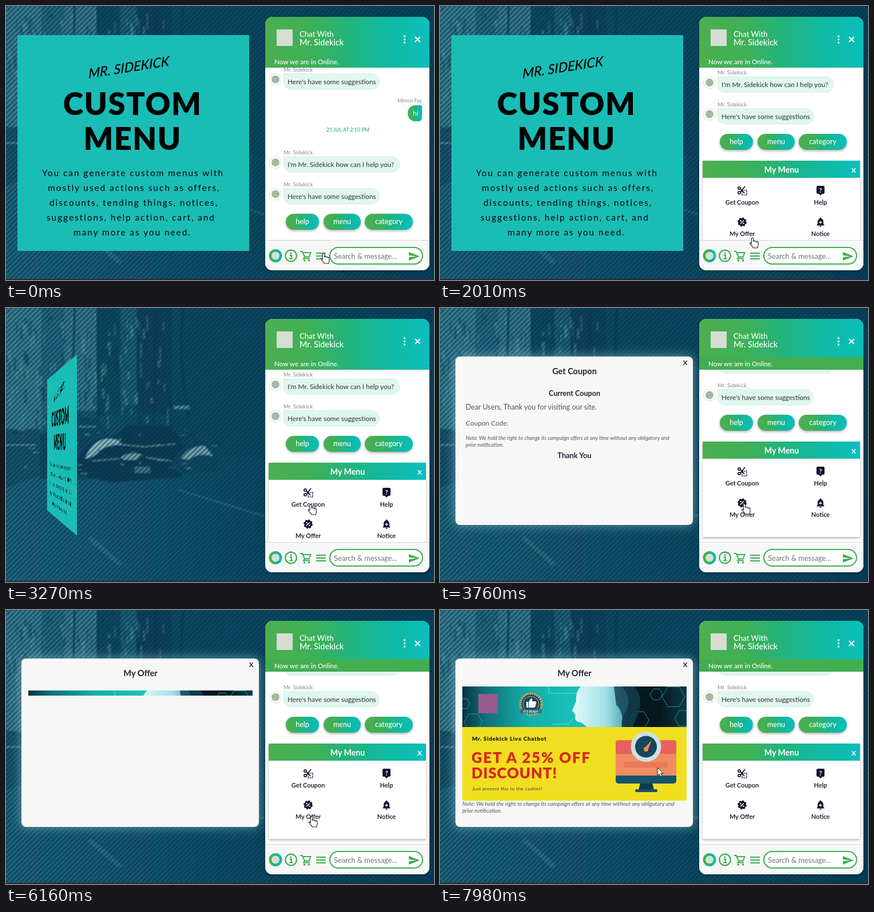
An HTML page for the animation above (8000 ms loop, 748x480 px).

```html
<!DOCTYPE html>
<html lang="en">
<head>
<meta charset="utf-8">
<title>Custom menu</title>
<style>
html, body { margin: 0; width: 100%; height: 100%; overflow: hidden; background: #063c52; }
#stage { position: relative; width: 748px; height: 480px; max-height: 100%; overflow: hidden; contain: strict; }
svg, #face { position: absolute; left: 0; top: 0; width: 748px; height: 480px; }
#face { transform-origin: 374px 240px; backface-visibility: hidden; }
text { font-family: Lato, "Open Sans", sans-serif; white-space: pre; }
.mid { text-anchor: middle; }
.bold { font-weight: 700; }
.black { font-weight: 900; }
.note { font-style: italic; }
.lift { filter: drop-shadow(0 2px 2px rgba(0,0,0,.3)); }
.glow { filter: drop-shadow(0 0 10px rgba(150,195,212,.65)); }
</style>
</head>
<body>
<div id="stage">
<svg id="street" viewBox="0 0 748 480"></svg>
<div id="face"><svg id="card" viewBox="0 0 748 480"></svg></div>
<svg id="ui" viewBox="0 0 748 480"></svg>
</div>
<script>
const LOOP = 8000;
const BOT = "Mr. Sidekick";
const GUEST = "Mirron Fay";
const $ = id => document.getElementById(id);
const rect = (x, y, w, h, fill, more = "") =>
  `<rect x="${x}" y="${y}" width="${w}" height="${h}" fill="${fill}" ${more}/>`;
const dot = (x, y, r, fill, more = "") =>
  `<circle cx="${x}" cy="${y}" r="${r}" fill="${fill}" ${more}/>`;
const path = (d, fill, more = "") => `<path d="${d}" fill="${fill}" ${more}/>`;
const line = (d, color, w, more = "") =>
  path(d, "none", `stroke="${color}" stroke-width="${w}" ${more}`);
const text = (x, y, size, fill, str, more = "") =>
  `<text x="${x}" y="${y}" font-size="${size}" fill="${fill}" ${more}>${str}</text>`;
const mid = 'class="mid"', midBold = 'class="mid bold"';

let seed = 11;
const rnd = () => (seed = (seed * 16807) % 2147483647) / 2147483647;

function drawStreet() {
  let s = `<defs>
    <linearGradient id="base" x2="1" y2=".15"><stop stop-color="#236a80"/>
      <stop offset=".38" stop-color="#0d4b62"/><stop offset="1" stop-color="#06425b"/></linearGradient>
    <linearGradient id="road" x2="1"><stop stop-color="#1c647b"/>
      <stop offset=".6" stop-color="#0a4a62"/><stop offset="1" stop-color="#06415a"/></linearGradient>
    <pattern id="hatch" width="6" height="6" patternUnits="userSpaceOnUse" patternTransform="rotate(-45)">
      <rect width="6" height="2.4" fill="#022c43" opacity=".5"/></pattern>
    <filter id="soft"><feGaussianBlur stdDeviation=".8"/></filter></defs>`;
  s += rect(0, 0, 748, 480, "url(#base)") + '<g filter="url(#soft)">';
  s += rect(0, 0, 62, 215, "#34798b") + rect(62, 0, 40, 190, "#22667b") + rect(102, 0, 56, 180, "#30748a");
  s += rect(158, 0, 42, 190, "#10485e") + rect(200, 0, 28, 170, "#1d5d72") + rect(228, 0, 62, 185, "#0c435a");
  for (let i = 0; i < 190; i++) {
    const x = rnd() * 290, y = rnd() * 195;
    s += rect(x, y, 1.5 + rnd() * 3, 6 + rnd() * 22, rnd() < .5 ? "#5e9ba7" : "#0a3d53", 'opacity=".45"');
  }
  s += line("M120 0L116 160M262 0L258 200M310 0Q300 90 320 190", "#0a3b52", 3);
  // road, cars and lane marks
  s += path("M0 310L150 260L420 258L748 330V480H0Z", "url(#road)");
  s += path("M0 212H60L72 290L0 315Z", "#17526a");
  s += path("M60 222L118 192H162L185 240L178 300H60Z", "#114b62");
  s += path("M122 270Q145 225 182 228L215 205H285L312 240L308 296L182 306L122 290Z", "#0a3d54");
  s += path("M290 270Q310 235 345 238L372 262L366 286L300 290Z", "#0f485f");
  s += path("M138 264Q150 232 176 229Q198 228 204 240Q176 238 162 252Q152 262 138 264Z", "#8cb8bf");
  s += path("M200 262Q212 252 238 256L228 266H206ZM305 264Q322 240 348 242L362 260Q335 252 320 266Z", "#7fadb6", 'opacity=".85"');
  s += line("M170 236L240 243L296 238M0 240H52M128 208H158M150 268L198 264M245 262L290 268", "#6fa5ae", 2.2, 'opacity=".75"');
  for (let i = 0; i < 60; i++) {
    const x = rnd() * 360, y = 205 + rnd() * 85;
    s += rect(x, y, 3 + rnd() * 10, 1 + rnd() * 2.5, rnd() < .5 ? "#6ea3ad" : "#06324a", 'opacity=".55"');
  }
  s += rect(225, 278, 27, 11, "#5d95a2", 'opacity=".6"') + rect(293, 171, 28, 6, "#6ea3ad", 'opacity=".7"');
  s += line("M146 402L200 450", "#39788a", 9, 'opacity=".6"') + line("M300 318L452 365", "#2f7185", 3, 'opacity=".7"') + "</g>";
  s += rect(0, 0, 748, 480, "url(#hatch)") + rect(0, 478, 748, 2, "#33283c");
  $("street").innerHTML = s;
}

function drawCard() {
  const lines = [[63, "You can generate custom menus with"], [73, "mostly used actions such as offers,"],
    [76, "discounts, tending things, notices,"], [71, "suggestions, help action, cart, and"], [118, "many more as you need."]];
  const big = 'class="mid black" letter-spacing="1.5"';
  $("card").innerHTML = rect(20, 51, 405, 378, "#1abdb6") +
    `<g transform="translate(144 127) rotate(-9) skewX(-10)">` +
    text(0, 0, 23.5, "#000", BOT.toUpperCase(), 'font-style="italic" font-weight="500"') + "</g>" +
    text(221, 191, 54, "#000", "CUSTOM", big) + text(221, 252, 54, "#000", "MENU", big) +
    lines.map(([x, str], i) => text(x, 298 + i * 26, 15.5, "#000", str, 'letter-spacing="1.9"')).join("");
}

function said(y, str, w) {
  return text(485, y - 4, 9.6, "#888", BOT) +
    dot(471, y + 10, 10.5, "#fff", 'stroke="#ddd"') + dot(471, y + 10, 7, "#a3bb9e") +
    path(`M485 ${y}H${485 + w - 13}a13.5 13.5 0 0 1 0 27.5H498.5a13.5 13.5 0 0 1-13.5-13.5Z`, "#dff7ef", 'stroke="#cdeae0" stroke-width=".7"') +
    text(492, y + 18, 11.8, "#2d3040", str);
}

function pill(x, w, str) {
  return rect(x, 364, w, 28, "url(#leaf)", 'rx="14" class="lift"') +
    text(x + w / 2, 382, 12.5, "#fff", str, 'class="mid" font-weight="500"');
}

function menu() {
  const ink = "#12122a";
  const at = (x, y, s) => `<g transform="translate(${x} ${y})">${s}</g>`;
  const label = (x, y, str) => text(x, y, 10.9, "#222a35", str, midBold);
  const coupon = dot(-5, -4, 2.2, "none", `stroke="${ink}" stroke-width="1.7"`) +
    dot(-5, 4, 2.2, "none", `stroke="${ink}" stroke-width="1.7"`) +
    line("M-3 -3L4 5M-3 3L5 -7", ink, 1.8) +
    rect(0, 0, 8, 8, "none", `stroke="${ink}" stroke-width="1.5" stroke-dasharray="2 1.2"`);
  const help = path("M-5 -8H5a2 2 0 0 1 2 2V4a2 2 0 0 1-2 2H3L0 9L-3 6H-5a2 2 0 0 1-2-2V-6a2 2 0 0 1 2-2Z", ink) +
    text(0, 3.5, 11, "#fff", "?", midBold);
  const offer = dot(0, 0, 6.8, ink, `stroke="${ink}" stroke-width="2.4" stroke-dasharray="3 2.34"`) +
    line("M-3 3L3 -3", "#fff", 1.4) + dot(-2.4, -2.2, 1.2, "#fff") + dot(2.4, 2.2, 1.2, "#fff");
  const bell = path("M0 -8a1.4 1.4 0 0 1 1.4 1.7Q5 -5 5 0V3.5L6.5 5V6H-6.5V5L-5 3.5V0Q-5 -5 -1.4 -6.3A1.4 1.4 0 0 1 0 -8ZM-1.8 6.8H1.8a1.8 1.8 0 0 1-3.6 0Z", ink) +
    line("M-2.6 .5H2.6M0 -2.1V3.1", "#fff", 1.3);
  return rect(459, 411, 275, 167, "#fff", 'class="lift"') + rect(459, 411, 275, 30, "url(#leaf)") +
    text(597, 431.5, 14.2, "#fff", "My Menu", midBold) + text(723, 432, 12, "#fff", "X", midBold) +
    at(528, 463, coupon) + label(528, 487.5, "Get Coupon") + at(665, 463, help) + label(665, 487.5, "Help") +
    at(528, 518.5, offer) + label(528, 543, "My Offer") + at(665, 518.5, bell) + label(665, 543, "Notice");
}

function footer() {
  const g = "#3dae4e";
  return path("M453 410H740V451a12 12 0 0 1-12 12H465a12 12 0 0 1-12-12Z", "#f7f7f7") +
    rect(453, 410, 287, 1, "#d8d8d8") +
    dot(471, 437.5, 11.5, "url(#leaf)") + dot(471, 437.5, 7, "#d3e3d0") +
    dot(498, 437.5, 9.8, "none", `stroke="${g}" stroke-width="2.2"`) + dot(498, 433, 1.6, g) +
    line("M495.5 436.5H498.8V442.5M495 442.5H501.5", g, 2.2) +
    line("M514 430H517.5L522 439.5H529.5L532.5 432H519M522 439.5L520 442.5H531", g, 1.9) +
    dot(521.5, 446, 1.8, g) + dot(529.5, 446, 1.8, g) +
    line("M542 433H559M542 438H559M542 443H559", g, 2) +
    rect(566, 423, 162, 29, "#fff", `rx="14.5" stroke="${g}" stroke-width="2"`) +
    text(573, 442.5, 12.8, "#757575", "Search &amp; message...") +
    path("M704 431L723 438.5L704 446V440.3L717 438.5L704 436.7Z", g);
}

function chat() {
  return rect(453, 19, 287, 444, "#fff", 'rx="13" class="lift"') +
    `<g clip-path="url(#view)"><g id="list">` +
    said(118.5, "Here's have some suggestions", 167) +
    text(727, 169, 9, "#888", GUEST, 'text-anchor="end"') +
    path("M715 174H727V196a6 6 0 0 1-6 6H715a13 14 0 0 1 0-28Z", "url(#leaf)") + text(711, 192, 12, "#fff", "hi") +
    text(597.5, 220, 8.9, "#1a9c8c", "21 JUL AT 2:10 PM", mid) +
    said(264, `I'm ${BOT} how can I help you?`, 202) +
    said(319.5, "Here's have some suggestions", 167) +
    pill(489, 58, "help") + pill(555, 65, "menu") + pill(627, 84, "category") + menu() + "</g></g>" +
    path("M453 108V32a13 13 0 0 1 13-13H727a13 13 0 0 1 13 13V108Z", "url(#leaf)") +
    `<g id="band">${rect(453, 86, 287, 22, "#43ae50")}</g>` + rect(453, 107, 287, 1, "#2f9c62", 'opacity=".5"') +
    rect(473, 41, 28, 29, "#d6ddd2") +
    text(513, 54, 13.2, "#fff", "Chat With", 'font-weight="500"') + text(513, 69, 14.4, "#fff", BOT, 'font-weight="500"') +
    text(469, 101.5, 11.6, "#fff", "Now we are in Online.", 'font-weight="500"') +
    [53, 58.5, 64].map(y => dot(696.5, y, 1.7, "#fff")).join("") +
    line("M714.8 54L723.8 63M723.8 54L714.8 63", "#fff", 1.9) + footer();
}

const note = (x, y, size) =>
  text(x, y, size, "#555", "Note: We hold the right to change its campaign offers at any time without any obligatory and", 'class="note"') +
  text(x, y + 11.5, size, "#555", "prior notification.", 'class="note"');

function banner() {
  const hex = (x, y, r) => {
    const pts = [0, 1, 2, 3, 4, 5].map(i => [x + r * Math.cos(i * Math.PI / 3), y + r * Math.sin(i * Math.PI / 3)].join());
    return `<polygon points="${pts.join(" ")}" fill="none" stroke="#22b5b5" stroke-width="1" opacity=".8"/>`;
  };
  return rect(39, 134, 392, 71, "url(#tech)") +
    hex(42, 164, 10) + hex(58, 196, 16) + hex(348, 193, 17) + hex(408, 152, 20) + hex(426, 190, 16) + hex(378, 148, 11) +
    line("M190 134V146H240M196 200H225L232 190", "#5fe0d8", 1) +
    path("M246 134H318Q336 155 326 176Q316 188 318 205H256Q248 196 242 196Q234 194 237 184L231 176L238 160Q236 145 246 134Z", "url(#skin)") +
    path("M304 134H340Q362 160 336 205H318Q322 180 308 166Z", "#123f50", 'opacity=".8"') +
    rect(67, 147, 34, 34, "#965a8d") +
    dot(159, 165, 18.5, "#17405a", 'stroke="#c9a55a" stroke-width="4" stroke-dasharray="3 1.2"') +
    dot(159, 165, 14, "#1b4862", 'stroke="#d8bd7a"') +
    path("M151 161H154V171H151ZM155 161L159 155Q162 154 161 160H167Q169 161 168 164L166 170Q165 171 163 171H155Z", "#fff") +
    rect(140, 174, 38, 7, "#2f6f86") + text(159, 179.5, 5, "#fff", "IT'S READY", midBold) +
    rect(39, 205, 392, 129, "#f0df20") +
    text(56, 229, 9.8, "#1a1a1a", `${BOT} Live Chatbot`, 'class="black" letter-spacing=".7"') +
    text(55, 268, 25.6, "#d9261c", "GET A 25% OFF", 'class="black" letter-spacing="2"') +
    text(55, 294.5, 25.6, "#d9261c", "DISCOUNT!", 'class="black" letter-spacing="1"') +
    text(56, 316, 8.4, "#444", "Just present this to the cashier!", 'letter-spacing=".25"') +
    path("M350 303H371L374 315H347Z", "#0f3a4c") + rect(341, 314, 39, 5, "#17536a", 'rx="2"') +
    rect(307, 228, 106, 76, "#17536a", 'rx="5"') + path("M307 290V233a5 5 0 0 1 5-5H408a5 5 0 0 1 5 5V290Z", "#f08c62") +
    path("M307 252V233a5 5 0 0 1 5-5H408a5 5 0 0 1 5 5V252Z", "#e9605f") +
    rect(322, 266, 76, 10, "#e9785a") +
    dot(360, 239.5, 26.5, "#cfe0e2") + dot(360, 239.5, 19, "#17475c") +
    path("M356.5 243L370 228L363 246Z", "#f08c42") + dot(360, 244, 4, "#f08c42");
}

function popup() {
  const ink = "#1f2630";
  const title = (y, size, str) => text(235, y, size, ink, str, midBold);
  return `<g id="popup">` + rect(27, 85, 415, 295, "#f7f7f7", 'rx="8" class="glow"') +
    text(428.5, 100, 11.5, ink, "X", midBold) +
    `<g id="coupon">` + title(116, 14.5, "Get Coupon") + title(154, 12.6, "Current Coupon") +
    text(45, 178, 12.4, "#555", "Dear Users, Thank you for visiting our site.") + text(45, 206, 11.9, "#555", "Coupon Code:") +
    note(45, 231, 9.3) + title(263, 12.8, "Thank You") + "</g>" +
    `<g id="offer">` + title(116, 14.7, "My Offer") +
    `<g id="shift"><g clip-path="url(#reveal)">${banner()}</g></g><g id="terms">${note(39, 343, 9.7)}</g></g></g>`;
}

function drawUi() {
  const stops = [[0, "#4caf50"], [.28, "#3fb057"], [.5, "#23b47a"], [.72, "#12b8a0"], [1, "#0abfbc"]];
  const ramp = (id, list) => `<linearGradient id="${id}">` +
    list.map(([o, c]) => `<stop offset="${o}" stop-color="${c}"/>`).join("") + "</linearGradient>";
  $("ui").innerHTML = "<defs>" + ramp("leaf", stops) +
    ramp("tech", [[0, "#0a3140"], [.1, "#0d6f78"], [.3, "#14b0aa"], [.55, "#1cc4bd"], [.75, "#06171e"], [.88, "#06171e"], [1, "#0a3a48"]]) +
    ramp("skin", [[0, "#e4fafa"], [.6, "#9fe0e4"], [1, "#3d9cab"]]) +
    `<clipPath id="view"><rect x="453" y="108" width="287" height="302"/></clipPath>
     <clipPath id="reveal"><rect id="sheet" x="39" y="134" width="392" height="200"/></clipPath></defs>` +
    popup() + chat() + `<g id="cursor"><g id="hand">` +
    path("M-1.6 1.6a1.6 1.6 0 0 1 3.2 0V7a1.5 1.5 0 0 1 3 .3 1.5 1.5 0 0 1 2.8.6 1.4 1.4 0 0 1 2.6.9V13c0 2-1 2.5-1.2 5H1.2C1 16-3.6 12.5-4.4 10.6c-.6-1.5 1.2-2 2.2-.8l.6.8Z", "#fff", 'stroke="#222" stroke-width="1.1"') +
    `</g><g id="arrow">` + path("M0 0V14L3.2 11L5.4 16L7.8 15L5.6 10.2H10Z", "#fff", 'stroke="#222"') + "</g></g>";
}

// rows hold a time followed by numbers, eased between rows
function track(rows, t) {
  let i = 0;
  while (i < rows.length - 2 && t >= rows[i + 1][0]) i++;
  const a = rows[i], b = rows[i + 1];
  let p = Math.min(1, Math.max(0, (t - a[0]) / (b[0] - a[0])));
  p = p * p * (3 - 2 * p);
  return a.slice(1).map((v, k) => v + (b[k + 1] - v) * p);
}

const POINTER = [[0, 555, 433], [400, 555, 433], [1000, 553, 437], [1700, 553, 437], [2500, 532.5, 344],
  [3400, 532.5, 344], [3760, 532, 343], [5000, 532, 343], [5600, 534, 362], [6800, 534, 362], [7600, 380, 276], [8000, 380, 276]];
const SCROLL = [[0, 0], [1450, 0], [1850, 140], [3480, 140], [3700, 177], [8000, 177]];
const REVEAL = [[6100, 9, 7], [6160, 9, 7], [6450, 200, 0], [8000, 200, 0]];

const show = (id, on) => $(id).setAttribute("visibility", on ? "inherit" : "hidden");
const move = (id, x, y) => $(id).setAttribute("transform", `translate(${x} ${y})`);

function render(t) {
  // the card sits on the front of a cube that turns left
  const turn = Math.min(90, Math.max(0, (t - 2674) / 10));
  $("face").style.transform = turn ? `perspective(746px) translateZ(-374px) rotateY(${-turn}deg) translateZ(374px)` : "none";
  $("face").style.visibility = turn < 72 ? "visible" : "hidden";

  move("list", 0, -track(SCROLL, t)[0]);
  show("band", t >= 3600);

  const offer = t >= 6000;
  $("popup").setAttribute("opacity", Math.min(1, Math.max(0, (t - 3420) / 150)));
  show("coupon", !offer);
  show("offer", offer);
  const [h, dy] = track(REVEAL, t);
  $("sheet").setAttribute("height", h);
  move("shift", 0, dy);
  show("terms", offer && t >= 6450);

  const [x, y] = track(POINTER, t);
  move("cursor", x, y);
  const link = x > 453;
  show("hand", link);
  show("arrow", !link);
}

drawStreet();
drawCard();
drawUi();
const start = performance.now();
function tick() {
  render((performance.now() - start) % LOOP);
  requestAnimationFrame(tick);
}
render(0);
requestAnimationFrame(tick);
</script>
</body>
</html>
```
